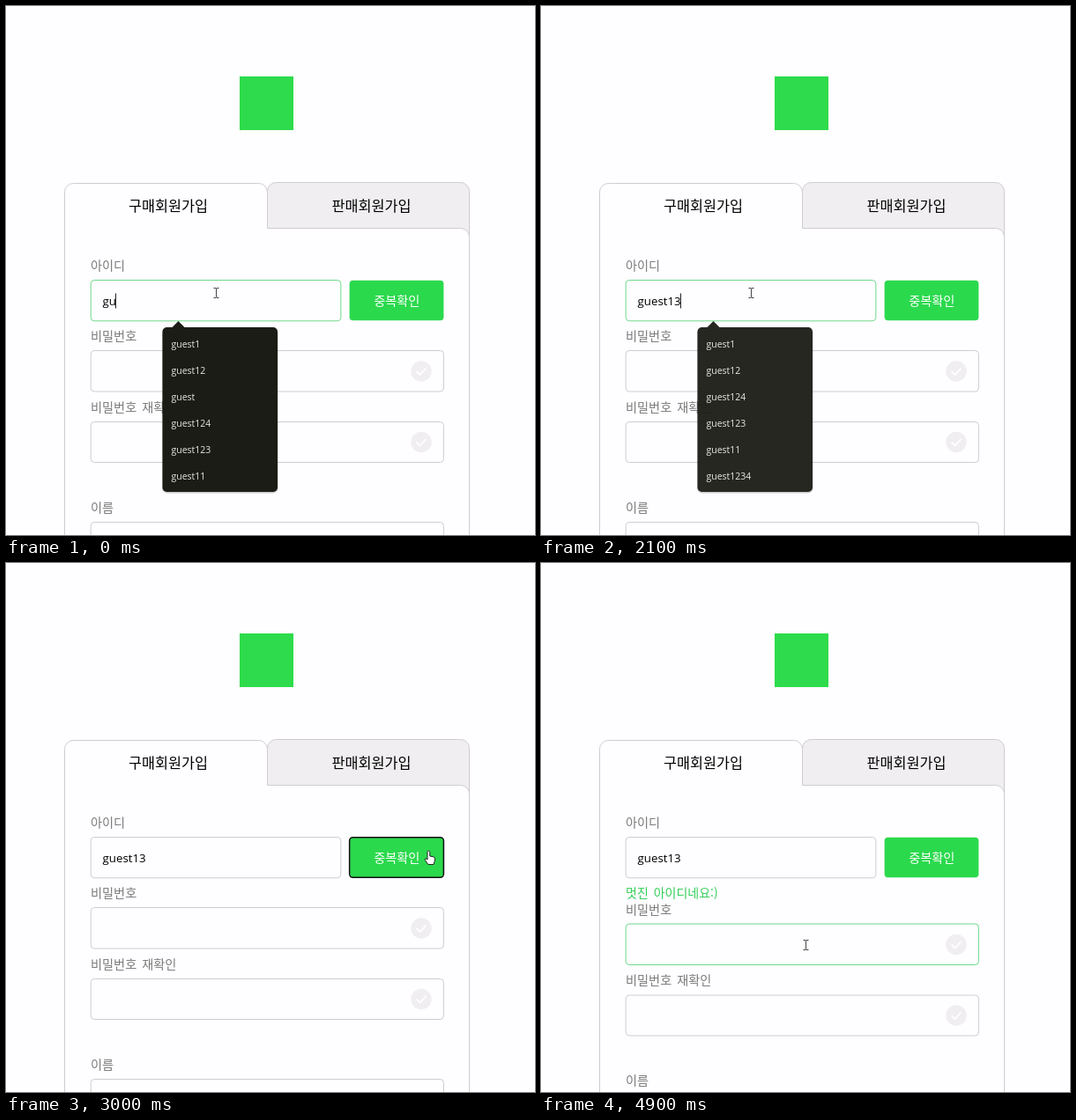
An HTML page that plays this animation: 600 by 601 pixels, repeating every 5 s.

```html
<!DOCTYPE html>
<html lang="ko">
<head>
<meta charset="utf-8">
<style>
  html, body { margin: 0; height: 100%; overflow: hidden; background: #fefdff; }
  svg { display: block; }
  text { font: 14.2px "Noto Sans CJK KR", sans-serif; fill: #7b7b7b; word-spacing: 2px; }
  .tab { font-size: 16.3px; fill: #000; text-anchor: middle; }
  .value { font: 13.3px "Open Sans", sans-serif; fill: #000; }
  .list text { font: 10.5px "Open Sans", sans-serif; fill: #e9e9e4; }
  .field, .panel { fill: #fefdff; stroke: #cfccd2; }
  .focus { stroke: #6fd98a; }
  .tick { fill: none; stroke: #fff; stroke-width: 1.8; }
</style>
</head>
<body>
<svg width="600" height="601" viewBox="0 0 600 601">
  <rect x="265" y="80" width="61" height="61" fill="#2edb4c"/>

  <path d="M296.5 252.5V210.5a10 10 0 0 1 10-10H515.5a10 10 0 0 1 10 10V264" fill="#f0eef0" stroke="#cfccd2"/>
  <path class="panel" d="M66.5 610V211.5a10 10 0 0 1 10-10H286.5a10 10 0 0 1 10 10V252.5H515.5a10 10 0 0 1 10 10V610"/>
  <text class="tab" x="184" y="233">구매회원가입</text>
  <text class="tab" x="414.5" y="232.5">판매회원가입</text>

  <text x="96" y="299.5">아이디</text>
  <rect id="idField" class="field" x="96.2" y="311.5" width="283.6" height="46.3" rx="4"/>
  <text id="idText" class="value" x="109.5" y="340"></text>
  <rect id="button" x="389.6" y="311.7" width="106.8" height="45.6" rx="4" fill="#2bd94d" stroke-width="1.5"/>
  <text x="443.3" y="340" text-anchor="middle" style="fill:#fff">중복확인</text>
  <text id="message" x="96" y="380" style="fill:#33cf58;font-size:14px">멋진 아이디네요:)</text>

  <g id="lower">
    <text x="96" y="380">비밀번호</text>
    <rect id="pwField" class="field" x="96.2" y="391.5" width="400.2" height="46.5" rx="4"/>
    <circle cx="471" cy="415" r="11.7" fill="#f0eef0"/>
    <path class="tick" d="M465.5 415l4 4 7-7.5"/>
    <text x="96" y="460.5">비밀번호 재확인</text>
    <rect class="field" x="96.2" y="472.5" width="400.2" height="46" rx="4"/>
    <circle cx="471" cy="495.5" r="11.7" fill="#f0eef0"/>
    <path class="tick" d="M465.5 495.5l4 4 7-7.5"/>
    <text x="96" y="574.5">이름</text>
    <rect class="field" x="96.2" y="586.5" width="400.2" height="46" rx="4"/>
  </g>

  <path id="caret" stroke="#222" d="M0 0v17"/>

  <g id="popup" class="list">
    <rect x="177" y="365.5" width="131.5" height="188" rx="6" fill="#000" opacity=".22"/>
    <path d="M187.500 366l8-8 8 8z" fill="#1c1c17"/>
    <rect x="177.500" y="365" width="130.5" height="187" rx="5" fill="#1c1c17"/>
    <g id="options"></g>
  </g>

  <path id="beam" fill="none" stroke="#444" d="M-3-5.500h2.500l.5.500.5-.5H3M-3 5.500h2.500l.5-.5.5.5H3M0-5V5"/>
  <path id="hand" fill="#fff" stroke="#222" d="M-1.300 1.500a1.300 1.400 0 0 1 2.700 0V6l4 .8q1.900.4 1.800 2.300l-.4 3-1.200 3.400H-.5L-4 10.500q-.6-1.800.8-1.600L-1.300 10z"/>
</svg>

<script>
const $ = id => document.getElementById(id);
const LOOP = 5000, STEP = 100;
const NAME = 'guest';
const typed = [[0, 'gu'], [100, 'gue'], [200, 'gues'], [500, NAME], [1100, NAME + 1], [2000, NAME + 13]];
const pointer = [[2300, 238.5, 326], [2700, 480, 335], [4000, 480, 335], [4300, 300.5, 434]];
const before = ['1', '12', '', '124', '123', '11'];
const after = ['1', '12', '124', '123', '11', '1234'];

const show = (id, on) => $(id).setAttribute('visibility', on ? 'visible' : 'hidden');
const move = (id, x, y) => $(id).setAttribute('transform', `translate(${x} ${y})`);
const within = (t, a, b) => t >= a && t < b;

function pointerAt(t) {
  const next = pointer.findIndex(p => p[0] > t);
  if (next < 0) return pointer.at(-1).slice(1);
  if (!next) return pointer[0].slice(1);
  const [t0, x0, y0] = pointer[next - 1], [t1, x1, y1] = pointer[next];
  const u = (t - t0) / (t1 - t0), k = u * u * (3 - 2 * u);
  return [x0 + (x1 - x0) * k, y0 + (y1 - y0) * k];
}

function drawOptions(suffixes) {
  $('options').innerHTML = suffixes
    .map((s, i) => `<text x="187.5" y="${387.7 + i * 30.1}">${NAME}${s}</text>`).join('');
}

function draw(t) {
  $('idText').textContent = typed.findLast(k => k[0] <= t)[1];
  $('idField').classList.toggle('focus', t < 2800);
  $('pwField').classList.toggle('focus', t >= 4400);
  $('button').setAttribute('stroke', within(t, 2800, 4400) ? '#111' : 'none');

  const checked = t >= 3500;
  show('message', checked);
  move('lower', 0, checked ? 18.5 : 0);

  drawOptions(t < 1100 ? before : after);
  $('popup').setAttribute('opacity', t <= 2000 ? 1 : t <= 2100 ? 0.95 : t <= 2200 ? 0.4 : 0);

  show('caret', t < 1000 || within(t, 1100, 1600) || within(t, 2000, 2600) || within(t, 4400, 4900));
  if (t >= 4400) move('caret', 110.5, 425);
  else move('caret', Math.floor(109.5 + $('idText').getComputedTextLength()) + 0.5, 326.5);

  const [x, y] = pointerAt(t);
  const overButton = x > 389 && y < 358;
  show('hand', overButton);
  show('beam', !overButton);
  move('hand', x - 0.7, y - 8);
  move('beam', x, y);
}

function frame() {
  const t = performance.now() % LOOP;
  draw(Math.floor(t / STEP) * STEP);
  requestAnimationFrame(frame);
}
frame();
</script>
</body>
</html>
```
